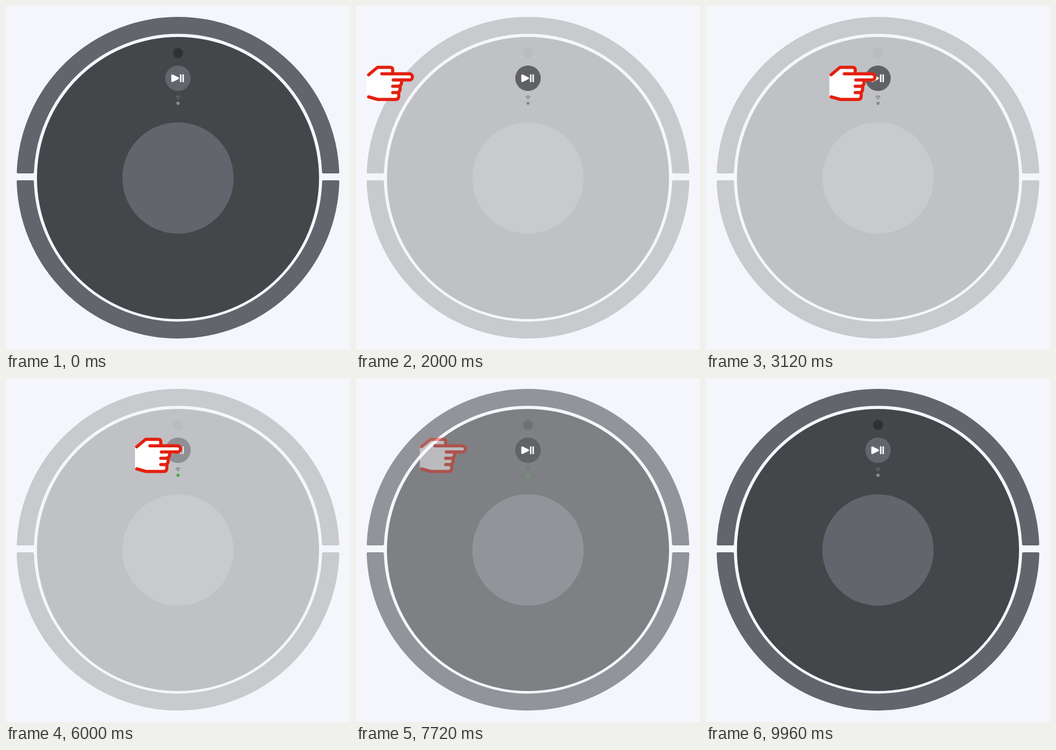
These frames come from a looping animation (600x600 px, 10 s). An HTML page:

```html
<!DOCTYPE html>
<html lang="en">
<head>
<meta charset="utf-8">
<title>Robot vacuum: press start</title>
<style>
  html, body { margin: 0; width: 100%; height: 100%; overflow: hidden; background: #f4f6fb; }
  svg { display: block; width: 100%; height: 100%; }
</style>
</head>
<body>
<svg viewBox="0 0 600 600">
  <g id="ring" stroke-width="4" stroke-linejoin="round">
    <path d="M20.7 290A279.5 279.5 0 0 1 579.3 290H553.3A253.5 253.5 0 0 0 46.7 290Z"/>
    <path d="M20.6 306A279.5 279.5 0 0 0 579.4 306H553.4A253.5 253.5 0 0 1 46.6 306Z"/>
  </g>
  <circle id="body" cx="300" cy="300" r="246"/>
  <circle id="lid" cx="300" cy="300" r="97"/>
  <circle id="sensor" cx="300" cy="82" r="8.7"/>
  <g id="button">
    <circle id="disc" cx="300" cy="126" r="22.2"/>
    <path d="M290 121V131L300 126Z" fill="#fff" stroke="#fff" stroke-width="3.4" stroke-linejoin="round"/>
    <path d="M304.7 120.2V131.8M309 120.2V131.8" stroke="#fff" stroke-width="2.6" stroke-linecap="round"/>
  </g>
  <g id="wifi">
    <path d="M295.4 158.2Q300 153.8 304.6 158.2L303.3 159.5Q300 156.6 296.7 159.5Z"/>
    <path d="M297.4 160.3Q300 158.2 302.6 160.3L300 163Z"/>
  </g>
  <circle id="light" cx="300" cy="169.6" r="2.9"/>
  <g id="hand">
    <path fill="#fff" d="M19 121L38 107H60Q64 107 64 111V118H93A5.5 5.5 0 0 1 93 129H80V133Q80 140 77 140V145Q77 151 75 151V157Q75 163 70 163H38L19 158Z"/>
    <path fill="none" stroke="#e3200f" stroke-width="5.5" stroke-linecap="round" stroke-linejoin="round"
      d="M22 120L37.5 107H59.5Q64 107 64 111V115M45 118.3H93A5.4 5.4 0 0 1 93 129.1H65M79.5 129.5V133Q79.5 140 73 140H64M77 140.5V144Q77 151 71 151H64M74.5 151.5V157Q74.5 163 69 163H38L22 158.5"/>
  </g>
</svg>
<script>
const LOOP = 10000;
const part = id => document.getElementById(id);

const progress = (t, from, to) => Math.min(1, Math.max(0, (t - from) / (to - from)));
const ease = (t, from, to) => {
  const p = progress(t, from, to);
  return p * p * (3 - 2 * p);
};
const mix = (a, b, p) => `rgb(${a.map((v, i) => Math.round(v + (b[i] - v) * p))})`;

// Colours at rest and while the body is dimmed
const tones = {
  ring: [[98, 101, 108], [201, 202, 206]],
  body: [[69, 70, 74], [192, 193, 197]],
  lid: [[98, 101, 108], [201, 202, 206]],
  sensor: [[47, 48, 52], [185, 187, 191]],
  disc: [[98, 101, 108], [95, 97, 102]],
  wifi: [[100, 102, 106], [134, 135, 139]]
};
const GREY = [139, 140, 144], GREEN = [70, 176, 74];

function draw(t) {
  const dim = ease(t, 1000, 2000) - ease(t, 7200, 8200);
  for (const id in tones) part(id).setAttribute('fill', mix(...tones[id], dim));
  part('ring').setAttribute('stroke', mix(...tones.ring, dim));

  const press = ease(t, 3200, 3600) - ease(t, 7200, 7600);
  part('button').setAttribute('opacity', 1 - 0.5 * press);

  const reach = 206 * (ease(t, 2600, 3200) - ease(t, 7200, 8175));
  part('hand').setAttribute('transform', `translate(${reach})`);
  part('hand').setAttribute('opacity', dim);

  const glow = t < 6000 ? 0 : 1 - progress(t, 6160, LOOP);
  part('light').setAttribute('fill', mix(GREY, GREEN, glow));
}

function tick() {
  draw(performance.now() % LOOP);
  requestAnimationFrame(tick);
}
tick();
</script>
</body>
</html>
```
